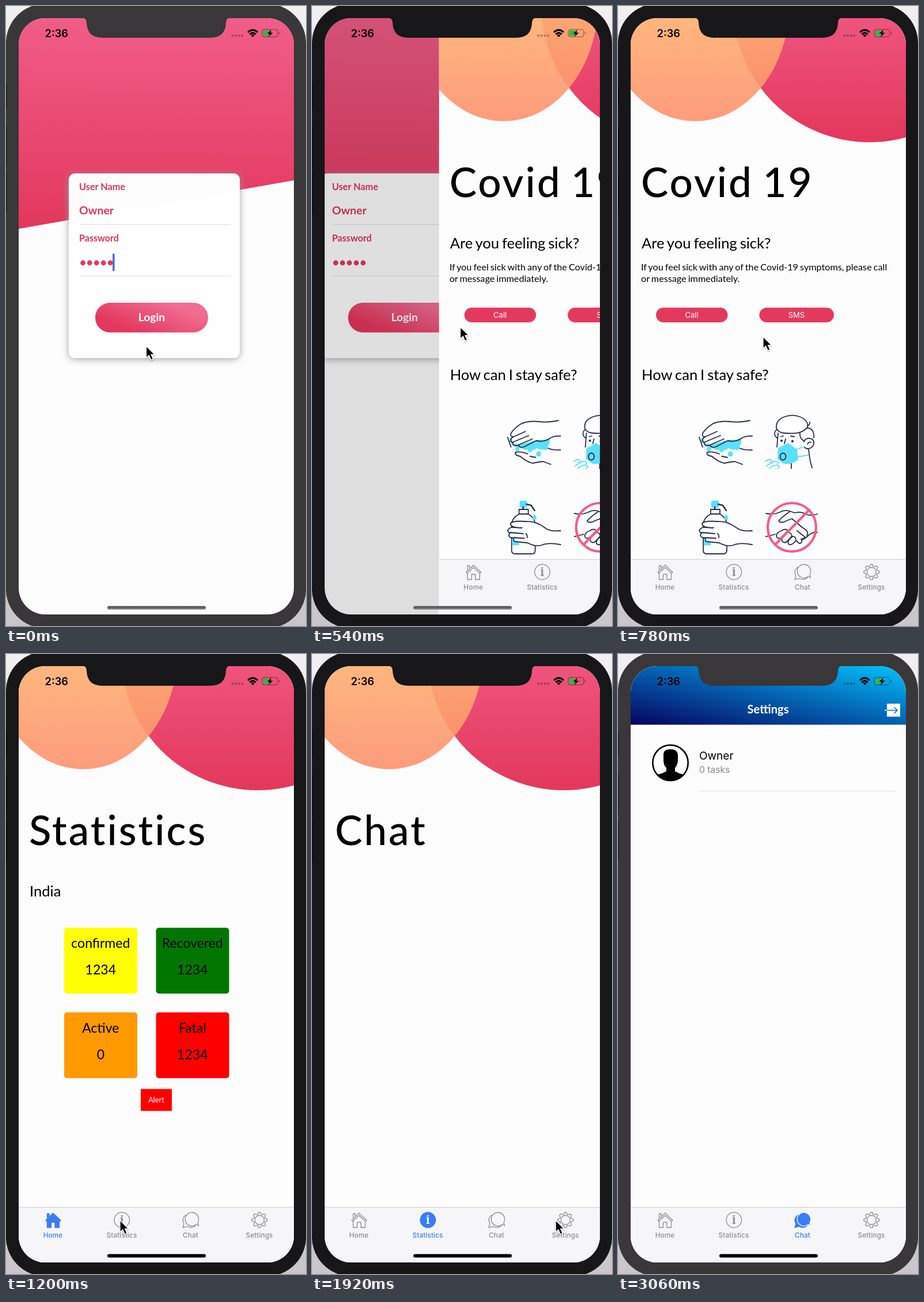
Write an HTML page that moves like this. It is 521 px wide and 1074 px high and loops after 3.12 s.

```html
<!DOCTYPE html>
<html lang="en">
<head>
<meta charset="utf-8">
<title>Phone app demo</title>
<style>
  html, body { margin: 0; width: 100%; height: 100%; overflow: hidden; }
  svg { display: block; width: 521px; height: 1074px; }
  text { font-family: Lato, sans-serif; white-space: pre; }
  .ui { font-family: Inter, sans-serif; }
  .mid { text-anchor: middle; }
  .bold { font-weight: 700; }
  .title, .head, .copy { word-spacing: -.064em; }
  .title { font-size: 71px; font-weight: 500; letter-spacing: 3px; }
  .head { font-size: 25.6px; }
  .copy { font-size: 16.2px; }
  .stat { font-size: 23px; }
  .ink { fill: none; stroke: #262d47; stroke-width: 1.8; stroke-linecap: round; stroke-linejoin: round; }
  .skin { fill: #fff; }
  .cyan { fill: #5be0fa; }
  .tab { color: #8b8b90; fill: none; stroke: currentColor; stroke-width: 1.3; stroke-linejoin: round; }
  .tab text { fill: currentColor; stroke: none; font-size: 11.7px; font-weight: 500; letter-spacing: .15px; }
  .tab .front { fill: #f6f5f8; }
  .tab .mark { font: 700 19px "Noto Serif", serif; }
  .on { color: #3a7cf6; }
  .on .solid, .on .front { fill: currentColor; }
  .on .front { stroke: #f6f5f8; }
  .on .mark { fill: #fff; }
</style>
</head>
<body>
<svg viewBox="0 0 521 1074" xmlns="http://www.w3.org/2000/svg">
  <defs>
    <clipPath id="screen"><rect x="22" y="21" width="478" height="1033" rx="46"/></clipPath>
    <clipPath id="page"><rect x="22" y="21" width="478" height="1033"/></clipPath>
    <clipPath id="face"><circle cx="91" cy="188.5" r="30"/></clipPath>
    <linearGradient id="desk" x2="0" y2="1"><stop stop-color="#f1eff2"/><stop offset="1" stop-color="#c9c5ca"/></linearGradient>
    <linearGradient id="pink" gradientUnits="userSpaceOnUse" x1="264" y1="21" x2="258" y2="380"><stop stop-color="#f05d88"/><stop offset="1" stop-color="#e3385e"/></linearGradient>
    <linearGradient id="red" gradientUnits="userSpaceOnUse" x1="0" y1="21" x2="0" y2="236"><stop stop-color="#ee547d"/><stop offset="1" stop-color="#e3375c"/></linearGradient>
    <linearGradient id="peach" gradientUnits="userSpaceOnUse" x1="0" y1="21" x2="0" y2="200"><stop stop-color="#fdae70"/><stop offset="1" stop-color="#fe916f"/></linearGradient>
    <linearGradient id="btn" gradientUnits="userSpaceOnUse" x1="240" y1="572" x2="266" y2="508"><stop stop-color="#e4375d"/><stop offset="1" stop-color="#f06c93"/></linearGradient>
    <linearGradient id="blue" x1="0" y1="1" x2="1" y2="0"><stop stop-color="#06045f"/><stop offset=".5" stop-color="#0460b0"/><stop offset="1" stop-color="#00c3fb"/></linearGradient>
    <linearGradient id="bar" x2="0" y2="1"><stop stop-color="#444"/><stop offset="1" stop-color="#8a8a8a"/></linearGradient>
    <filter id="shade" x="-20%" y="-20%" width="140%" height="140%"><feDropShadow dx="0" dy="2" stdDeviation="6.5" flood-color="#98989c" flood-opacity=".9"/></filter>
    <filter id="soft" x="-50%" y="-50%" width="200%" height="200%"><feDropShadow dx="0" dy="1.5" stdDeviation="1.2" flood-opacity=".3"/></filter>
  </defs>

  <rect width="521" height="1074" fill="url(#desk)"/>
  <rect id="bezel" y="-4" width="521" height="1082" rx="68"/>
  <g id="keys">
    <rect y="136" width="1.5" height="40"/><rect y="208" width="1.5" height="70"/><rect y="289" width="1.5" height="69"/>
  </g>

  <g clip-path="url(#screen)">
    <rect x="22" y="21" width="478" height="1033" fill="#fefdfe"/>

    <g id="login">
      <path d="M22 21H500V302L22 386Z" fill="url(#pink)"/>
      <rect x="109" y="290" width="297" height="320" rx="11" fill="#fff" fill-opacity=".98" filter="url(#shade)"/>
      <g class="bold" fill="#d9375c">
        <text x="127" y="319" font-size="16.3">User Name</text>
        <text x="127" y="361" font-size="19.5">Owner</text>
        <text x="127" y="408" font-size="16.1">Password</text>
      </g>
      <path d="M128 378.5H390M128 467.5H390" stroke="#dfdde2"/>
      <g id="dots" fill="#e0395f"></g>
      <rect id="caret" x="185" y="429" width="3.6" height="30" rx="1" fill="#4073df"/>
      <rect x="155" y="514" width="196" height="51.5" rx="25.7" fill="url(#btn)"/>
      <text class="mid bold" x="253" y="545.5" font-size="19.3" fill="#fff">Login</text>
    </g>
    <rect id="dim" x="22" y="21" width="478" height="1033"/>

    <g id="app">
      <rect x="22" y="21" width="478" height="1033" fill="#fefdfe"/>
      <g id="blobs" clip-path="url(#page)">
        <ellipse cx="437" cy="0" rx="237" ry="236" fill="url(#red)"/>
        <ellipse cx="134" cy="-5" rx="164" ry="204.5" fill="url(#peach)" opacity=".9"/>
      </g>

      <g id="home">
        <text class="title" x="40" y="331">Covid 19</text>
        <text class="head" x="41" y="420">Are you feeling sick?</text>
        <text class="copy" x="40" y="458">If you feel sick with any of the Covid-19 symptoms, please call</text>
        <text class="copy" x="40" y="478">or message immediately.</text>
        <g fill="#e4395f"><rect x="66" y="522.5" width="124.5" height="25.5" rx="12.7"/><rect x="245.5" y="522.5" width="129.5" height="25.5" rx="12.7"/></g>
        <g class="mid" fill="#fff" font-size="13"><text class="ui" x="128" y="540">Call</text><text class="ui" x="310" y="540">SMS</text></g>
        <text class="head" x="41" y="648">How can I stay safe?</text>

        <g class="ink">
          <path class="cyan" stroke="none" d="M146 748q-5 8 4 10q4 10 14 6q6 8 14 3q8 5 14-1q10 6 16-2q9-4 5-16z"/>
          <path class="skin" stroke="none" d="M229 717Q190 717 164 724Q152 732 147 741Q146 758 160 760L190 752Q212 752 233 745Z"/>
          <path d="M229 718Q210 722 196 720Q176 718 164 724Q153 731 147 740Q145 747 152 746L172 737M151 746Q143 752 149 756L178 744M150 756Q149 763 158 761L184 750M160 761Q163 767 171 763L191 753Q205 756 214 749Q222 744 233 745"/>
          <path d="M141 747L147 764M155 773Q164 771 176 776M155 773Q152 778 163 780Q173 789 184 792Q194 790 203 789L216 794M211 766Q221 770 233 769M180 780L190 782"/>
          <g class="cyan" stroke="none"><circle cx="195" cy="776" r="4.5"/><circle cx="158" cy="768" r="3.5"/><circle cx="207" cy="765" r="4"/><circle cx="180" cy="769" r="4"/></g>
        </g>

        <g class="ink">
          <path class="skin" d="M275 727C276 712 300 706 314 711C328 715 332 726 328 731C318 741 306 741 292 740C281 740 274 735 275 727Z"/>
          <path d="M275 734Q268 742 277 749M278 740L276 764M328 731Q341 731 340 748M329 727Q333 726 333 721M316 739Q315 748 322 753M301 791V801M331 768Q333 788 337 800"/>
          <path class="skin" d="M323 755C325 746 342 747 340 758C339 766 328 770 324 764M329 759Q331 754 335 756"/>
          <path d="M283 746l4-1M300 745l6 1M291 750l-2 8"/>
          <circle cx="284" cy="753" r="1.2" fill="#262d47"/><circle cx="303" cy="754" r="1.2" fill="#262d47"/>
          <path class="cyan" stroke="none" d="M278 766L295 757L311 768L313 786Q302 795 288 793L277 785Z"/>
          <g stroke="#5be0fa"><path d="M310 768L324 763M312 781L330 778M256 789q8-6 12-1t-5 2M258 797q12-9 17-8t2 6M263 801q7-7 14-5t0 5"/></g>
          <ellipse cx="286.500" cy="780.500" rx="5" ry="6"/>
        </g>

        <g class="ink">
          <path d="M161 880V872H177V880Q189 887 189 899V943Q189 949 183 949H154Q148 949 148 943V899Q148 887 161 880ZH177"/>
          <rect class="cyan" stroke="none" x="162" y="857" width="13" height="12" rx="2"/>
          <path d="M168 868V872M174 863L182 865L188 874" stroke-width="2.5"/>
          <rect class="cyan" stroke="none" x="149" y="918" width="12" height="16"/>
          <path class="cyan" stroke="none" d="M188 880q-7 10 0 10t0-10z"/>
          <path class="skin" d="M233 909Q215 911 206 904Q190 892 174 893Q148 891 146 897Q147 904 166 904L148 903Q138 907 143 912L168 914L146 912Q140 918 147 921L170 922L152 921Q150 928 156 928L176 930Q188 937 200 934Q212 929 233 933M173 914Q176 917 175 921"/>
        </g>

        <g class="ink">
          <path d="M257 879Q270 882 281 877Q289 872 298 875L307 878Q318 875 325 880Q334 884 346 880M257 919Q267 917 273 915M346 912Q337 911 331 917Q327 921 320 925M298 876Q285 885 279 892Q284 897 292 892L302 888L321 904Q333 911 328 917"/>
          <path class="skin" d="M284 909Q276 911 275 918Q276 924 283 921L295 909Q291 904 284 909M293 913Q283 921 285 927Q289 932 294 927L302 918Q300 910 293 913M303 919Q293 926 296 932Q301 936 309 926Q309 918 303 919M309 926L315 931Q321 931 318 923L326 921L311 909"/>
          <g stroke="#f45b86" stroke-width="4.200"><circle cx="302" cy="903" r="42"/><path d="M273 933L332 873"/></g>
        </g>
      </g>

      <g id="stats">
        <text class="title" x="40" y="331">Statistics</text>
        <text class="head" x="41" y="420">India</text>
        <g id="cards"></g>
        <rect x="234" y="753.5" width="54" height="38" fill="#f00"/>
        <text class="mid" x="261" y="776.7" font-size="12.8" fill="#fff">Alert</text>
      </g>

      <g id="chat"><text class="title" x="40" y="331">Chat</text></g>

      <g id="settings">
        <rect x="22" y="21" width="478" height="101.5" fill="url(#blue)"/>
        <text class="mid bold" x="260.500" y="103" font-size="20.2" fill="#fff">Settings</text>
        <rect x="467" y="86" width="23" height="22.5" fill="#fff"/>
        <path d="M463 97.500H467" stroke="#fff" stroke-width="1.500"/>
        <path d="M467 97.500H485M479.500 92L485 97.500L479.500 103" fill="none" stroke="#1568b4" stroke-width="1.500"/>
        <circle cx="91" cy="188.500" r="30.700" fill="#fff" stroke="#000" stroke-width="2.600"/>
        <path clip-path="url(#face)" d="M79 174Q79 165 91 165T104 174V184Q103 194 99 197V203Q107 208 116 209V222H66V209Q76 208 84 203V197Q79 193 79 184Z"/>
        <text class="ui" x="141" y="183" font-size="19">Owner</text>
        <text class="ui" x="141" y="206" font-size="15.6" fill="#87878b">0 tasks</text>
        <path d="M142 237.500H482" stroke="#dedee2"/>
      </g>

      <rect x="22" y="958" width="478" height="96" fill="#f6f5f8"/>
      <path d="M22 958.500H500" stroke="#cfced3"/>
      <g class="tab">
        <path class="solid" d="M71.500 982V993.500H78.500V984.500H85V993.500H92.500V982M69 981L81.700 968.500L95 981L93 983L81.700 972.500L71 983ZM71.500 978V969.500H75V974"/>
        <path class="solid" stroke="none" d="M71.500 982L81.700 972L92.500 982V993.500H85V984.500H78.500V993.500H71.500Z"/>
        <text class="ui mid" x="81.500" y="1011">Home</text>
      </g>
      <g class="tab">
        <circle class="solid" cx="201.300" cy="980.500" r="13.300"/>
        <text class="mark mid" x="201.300" y="987">i</text>
        <text class="ui mid" x="201" y="1011">Statistics</text>
      </g>
      <g class="tab">
        <path class="solid" d="M312 972Q304 978 309 987L307 993.500L314 991.500Q322 996 329 990Z"/>
        <path class="front" d="M330.500 988A11.700 11.700 0 1 1 333 985L334.500 990.500Z"/>
        <text class="ui mid" x="320.500" y="1011">Chat</text>
      </g>
      <g class="tab">
        <path id="gear" class="solid"/><circle cx="440.300" cy="980.500" r="8"/>
        <text class="ui mid" x="440" y="1011">Settings</text>
      </g>
    </g>
  </g>

  <path id="notch" d="M132 20Q140 21 140 29Q141 55 167 55H355Q381 55 382 29Q382 21 390 20Z"/>
  <text class="ui" x="67.500" y="53.500" font-size="18.300" font-weight="600">2:36</text>
  <g id="signal" opacity=".27"></g>
  <g fill="none" stroke="#000" stroke-width="3">
    <path d="M420 45.500Q428.500 37.500 437 45.500M423.200 49Q428.500 44 433.800 49"/>
    <path stroke="none" fill="#000" d="M425.200 50.500Q428.500 47.800 431.800 50.500L428.500 54Z"/>
  </g>
  <rect x="445" y="40.500" width="27" height="13" rx="3.500" fill="none" stroke="#000" stroke-opacity=".45"/>
  <path d="M474 45v4q3-2 0-4" opacity=".45"/>
  <path d="M448 42H457.500V52H448Q446.500 52 446.500 50.500V43.500Q446.500 42 448 42Z" fill="#35b54b"/>
  <path d="M461 41L453.500 48H457.800L456 53.500L463.500 46.200H459.200Z"/>
  <rect id="grip" x="176" y="1039.500" width="171" height="6" rx="3"/>
  <path id="cursor" filter="url(#soft)" d="M0 0V20.500L4.700 16.200L8.200 24L12 22.300L8.600 14.700H14.800Z" stroke="#fff" stroke-width="1.300"/>
</svg>
<script>
const LOOP = 3120, STEP = 60;
const PUSH = 490, PUSH_END = 780;
const $ = id => document.getElementById(id);
const show = (id, on) => $(id).style.display = on ? '' : 'none';
const shift = (id, x, y = 0) => $(id).setAttribute('transform', `translate(${x} ${y})`);
const circles = (n, x, gap, y, r) =>
  Array.from({ length: n }, (_, i) => `<circle cx="${x + i * gap}" cy="${y}" r="${r}"/>`).join('');

$('dots').innerHTML = circles(5, 133.5, 11.9, 445, 4.4);
$('signal').innerHTML = circles(4, 393.3, 5.6, 51.3, 2.1);

const card = (x, y, color, label, value) => `
  <rect x="${x}" y="${y}" width="127" height="114" rx="5" fill="${color}"/>
  <text class="stat mid" x="${x + 63.3}" y="${y + 35}">${label}</text>
  <text class="stat mid" x="${x + 63.3}" y="${y + 81}">${value}</text>`;
$('cards').innerHTML =
  card(101, 474.3, '#ff0', 'confirmed', 1234) + card(260.5, 474.3, '#007600', 'Recovered', 1234) +
  card(101, 620.8, '#f90', 'Active', 0) + card(260.5, 620.8, '#f00', 'Fatal', 1234);

// Eight rounded teeth.
const gear = Array.from({ length: 96 }, (_, i) => {
  const a = i * Math.PI / 48, r = 11.8 + 1.8 * Math.tanh(2 * Math.cos(8 * a));
  return `${(440.3 + r * Math.sin(a)).toFixed(2)} ${(980.5 - r * Math.cos(a)).toFixed(2)}`;
});
$('gear').setAttribute('d', `M${gear.join('L')}Z`);

// Start time, page, highlighted tab
const pages = [[0, 'home', -1], [1200, 'stats', 0], [1620, 'chat', 1], [2100, 'settings', 2]];
// Time, x, y of the pointer tip
const path = [
  [0, 243.5, 589], [300, 257.5, 556], [600, 257.5, 556], [780, 252, 573],
  [1140, 196, 981], [1260, 200, 981], [1500, 308, 981], [1620, 312, 981],
  [1980, 432, 981], [2100, 432, 981], [2460, 386.5, 215.5], [2820, 535, 40]
];
const tabs = document.querySelectorAll('.tab');

function pointer(t) {
  const i = path.findIndex(p => p[0] > t);
  if (i < 0) return null;
  const [t0, x0, y0] = path[i - 1], [t1, x1, y1] = path[i];
  const u = (t - t0) / (t1 - t0), e = u * u * (3 - 2 * u);
  return [x0 + (x1 - x0) * e, y0 + (y1 - y0) * e];
}

// Critically damped spring from 1 to 0.
function remaining(t) {
  if (t < PUSH) return 1;
  if (t >= PUSH_END) return 0;
  const s = (t - PUSH) * 0.0393;
  return (1 + s) * Math.exp(-s);
}

function render(t) {
  const left = remaining(t);
  shift('app', 478 * left);
  shift('login', -158 * (1 - left));
  show('login', left > 0);
  $('dim').setAttribute('opacity', 0.21 * (1 - left));
  show('caret', t < 480);

  const [, page, tab] = pages.filter(p => p[0] <= t).pop();
  for (const p of pages) show(p[1], p[1] === page);
  show('blobs', page !== 'settings');
  tabs.forEach((el, i) => el.classList.toggle('on', i === tab));

  const idle = t < 120 || t >= 2820;
  for (const id of ['bezel', 'notch']) $(id).setAttribute('fill', idle ? '#393739' : '#171619');
  $('keys').setAttribute('fill', idle ? '#222024' : '#09080a');
  $('grip').setAttribute('fill', t < 1200 ? 'url(#bar)' : '#000');

  const tip = pointer(t);
  show('cursor', tip);
  if (tip) shift('cursor', ...tip);
}

const start = performance.now();
function tick() {
  const t = (performance.now() - start) % LOOP;
  render(Math.floor(t / STEP) * STEP);
  requestAnimationFrame(tick);
}
tick();
</script>
</body>
</html>
```
